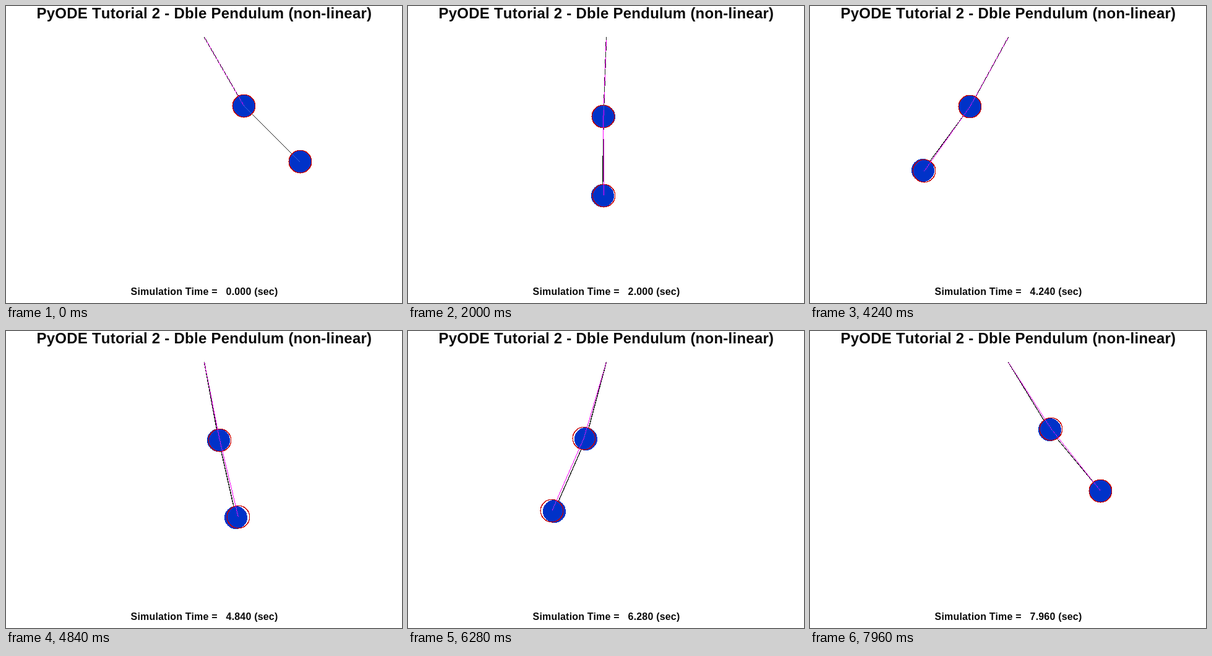
Recreate the animation shown at these times as an HTML page. Size 640x480 px, loop 8 s.

```html
<!DOCTYPE html>
<html lang="en">
<head>
<meta charset="utf-8">
<title>Double pendulum</title>
<style>
  html, body { margin: 0; width: 100%; height: 100%; overflow: hidden; background: #fff; }
  svg { display: block; width: 640px; height: 480px; }
  text { font-family: "Liberation Sans", Arial, sans-serif; font-weight: bold; text-anchor: middle; white-space: pre; fill: #0a0a0a; }
  .title { font-size: 24px; letter-spacing: .25px; font-kerning: none; }
  #clock { font-size: 16px; letter-spacing: .18px; }
  .crisp { shape-rendering: crispEdges; }
</style>
</head>
<body>
<svg viewBox="0 0 640 480">
  <text class="title" x="320.4" y="20">PyODE Tutorial 2 - Dble Pendulum (non-linear)</text>
  <g class="crisp">
    <path id="dark" fill="#222"/>
    <g id="discs" fill="#0032c8"><circle r="18.5"/><circle r="18.5"/></g>
    <g id="rings" fill="none" stroke="#c80000" stroke-width="1.5"><circle r="18.25"/><circle r="18.25"/></g>
    <path id="soft" fill="#3c64dc"/>
    <path id="solid" fill="#f0f"/>
  </g>
  <text id="clock" x="320.5" y="467"></text>
</svg>
<script>
const STEP = 40, COUNT = 200, SUB = 20;
const PIVOT = [320, 50], LENGTH = 128, GRAVITY = 9.81;
const RADIUS = 18.5, INERTIA = 0.4 * (RADIUS / LENGTH) ** 2;
const $ = id => document.getElementById(id);

// State is [angle 1, angle 2, speed 1, speed 2]; k is the bobs' own inertia.
function slope([a, b, u, v], k) {
  const c = Math.cos(a - b), s = Math.sin(a - b);
  const p = -s * v * v - 2 * GRAVITY * Math.sin(a);
  const q = s * u * u - GRAVITY * Math.sin(b);
  const det = (2 + k) * (1 + k) - c * c;
  return [u, v, (p * (1 + k) - c * q) / det, ((2 + k) * q - c * p) / det];
}

function advance(y, h, k) {
  const add = (d, f) => y.map((n, i) => n + d[i] * f);
  const k1 = slope(y, k), k2 = slope(add(k1, h / 2), k);
  const k3 = slope(add(k2, h / 2), k), k4 = slope(add(k3, h), k);
  return y.map((n, i) => n + h / 6 * (k1[i] + 2 * k2[i] + 2 * k3[i] + k4[i]));
}

function swing([x, y], angle) {
  return [x + LENGTH * Math.sin(angle), y + LENGTH * Math.cos(angle)];
}

function simulate(k) {
  let state = [Math.PI / 6, Math.PI / 4, 0, 0];
  return Array.from({ length: COUNT }, () => {
    const first = swing(PIVOT, state[0]);
    const pose = [first, swing(first, state[1])];
    for (let i = 0; i < SUB; i++) state = advance(state, STEP / 1000 / SUB, k);
    return pose;
  });
}

const bodies = simulate(INERTIA), theory = simulate(0);

// Walks a line pixel by pixel; off is the distance from the border of two pixels,
// and (nx, ny) is the neighbour across that border.
function pixelLine([x0, y0], [x1, y1], emit) {
  const steep = Math.abs(y1 - y0) > Math.abs(x1 - x0);
  let [a0, b0, a1, b1] = steep ? [y0, x0, y1, x1] : [x0, y0, x1, y1];
  if (a0 > a1) [a0, b0, a1, b1] = [a1, b1, a0, b0];
  for (let a = Math.ceil(a0); a <= a1; a++) {
    const b = b0 + (b1 - b0) * (a - a0) / (a1 - a0);
    const cell = Math.round(b), next = cell > b ? cell - 1 : cell + 1;
    const off = 0.5 - Math.abs(b - cell);
    if (steep) emit(cell, a, off, next, a);
    else emit(a, cell, off, a, next);
  }
}

function rods(pose, emit) {
  pixelLine(PIVOT, pose[0], emit);
  pixelLine(pose[0], pose[1], emit);
}

function place(group, pose) {
  pose.forEach(([x, y], i) => {
    const c = group.children[i];
    c.setAttribute("cx", Math.round(x) + 0.5);
    c.setAttribute("cy", Math.round(y) + 0.5);
  });
}

const dot = (x, y) => `M${x} ${y}h1v1h-1z`;

function draw(ms) {
  const i = Math.floor(ms / STEP) % COUNT, body = bodies[i], ideal = theory[i];
  const dark = new Set();
  rods(body, (x, y, off, nx, ny) => {
    dark.add(dot(x, y));
    if (off < 0.25) dark.add(dot(nx, ny));
  });
  let solid = "", soft = "";
  rods(ideal, (x, y, off) => {
    const pixel = dot(x, y);
    const inside = body.some(([cx, cy]) => Math.hypot(x - cx, y - cy) < RADIUS - 1);
    if (off < 0.33 || !inside && !dark.has(pixel)) solid += pixel;
    else if (inside) soft += pixel;
  });
  place($("discs"), body);
  place($("rings"), ideal);
  $("dark").setAttribute("d", [...dark].join(""));
  $("solid").setAttribute("d", solid);
  $("soft").setAttribute("d", soft);
  $("clock").textContent = "Simulation Time =   " + (i * STEP / 1000).toFixed(3) + " (sec)";
}

const start = performance.now();
function tick() {
  draw(performance.now() - start);
  requestAnimationFrame(tick);
}
tick();
</script>
</body>
</html>
```
